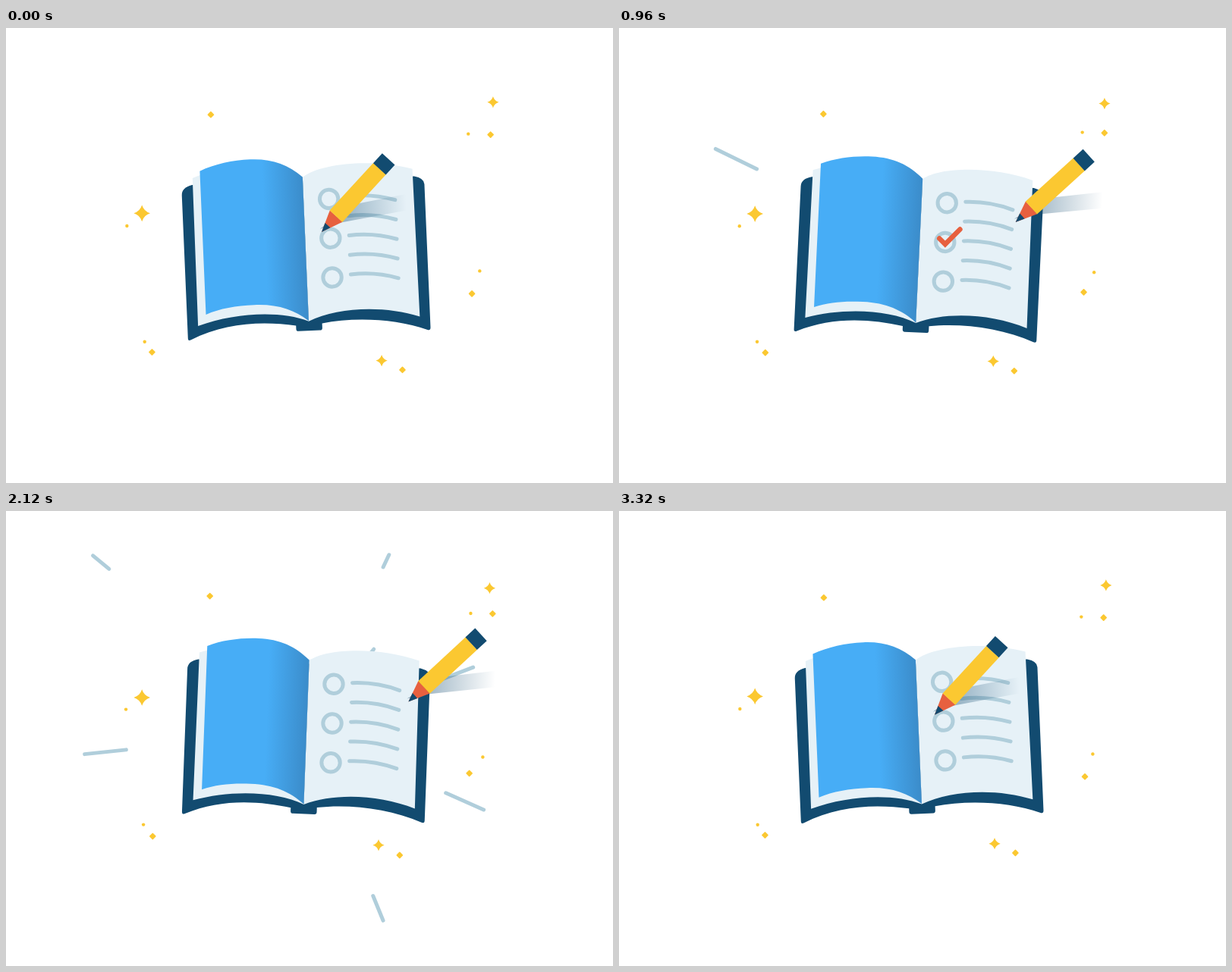
An HTML page with a canvas that plays this animation: 800x600 px, repeating every 3.36 s.

```html
<!DOCTYPE html>
<html lang="en">
<head>
<meta charset="utf-8">
<title>Notebook and pencil</title>
<style>
html, body { margin: 0; width: 100%; height: 100%; overflow: hidden; background: #fff; }
canvas { display: block; width: 800px; height: 600px; }
</style>
</head>
<body>
<canvas id="stage" width="800" height="600"></canvas>
<script>
const ctx = document.getElementById('stage').getContext('2d');
const LOOP = 3360, STEP = 40, TAU = Math.PI * 2, DEG = Math.PI / 180;
const NAVY = '#124b70', PAPER = '#e6f1f7', MIST = '#b0cedb';
const YELLOW = '#fbc831', RED = '#e7603f', BLUE = '#47adf6';

const cover = new Path2D('M250 200Q236 203 236 213V402Q236 406 240 404C285 383 335 383 379 391V395.5Q379 398.5 382 398.5H410.5Q413.5 398.5 413.5 395.5V389.5C455 383 510 387 552 404Q556 405.5 556 401V212Q556 204 543 201Z');
const leftPage = new Path2D('M251 191Q320 165 396 196V386C360 370 300 370 250 386Z');
const rightPage = new Path2D('M396 196C420 178 490 175 541 191L542.5 386C495 369 435 369 396 386Z');
const bluePage = new Path2D('M261 182C281 173.5 305 169.5 328 169.5C356 169.5 377 178 396 195.5V385.5C377 370 356 361.5 325 361.5C301 361.5 280 364 261 371.5Z');
const shade = new Path2D('M-2 -4L18 -10L113 -23.5V-45L42 -34Z');

function fade(from, to, start, end) {
  const g = ctx.createLinearGradient(from, 0, to, 0);
  g.addColorStop(0, start);
  g.addColorStop(1, end);
  return g;
}
const blueFill = fade(343, 396, BLUE, '#3b8cca');
const shadeFill = fade(15, 113, 'rgba(18,75,112,.44)', 'rgba(18,75,112,0)');

// Rays: heading in degrees and first launch
const RAY_LIFE = 420;
const rays = [
  [-154, 703], [-140.5, 190], [-113, 140], [-95, 50], [-64.7, 142], [-50.2, 318], [-20.8, 142],
  [-6.4, 400], [23.9, 137], [52.6, 2401], [67.8, 194], [98, 506], [130.4, 2254], [174, 1835]
];

// Sparkles by shape: x, y and heading of the sway
const sparkles = {
  star: [[179.2, 245.2, -90], [639.6, 99.8, -40], [493, 439.6, -25]],
  gem: [[640, 138, 117], [269.3, 113.2, 60], [192.9, 428.2, -120], [520.6, 452.4, -40], [612.3, 348.1, 52]],
  dot: [[610.9, 137.3, 125], [158.7, 261.3, -24], [181.9, 413.7, 8], [626.4, 322.5, -135]]
};

const check = [[421.7, 273.3], [429.7, 280.5], [448.3, 260]];
const legs = [0, 1].map(i => Math.hypot(check[i + 1][0] - check[i][0], check[i + 1][1] - check[i][1]));
const checkLength = legs[0] + legs[1];

const mix = (a, b, k) => a + (b - a) * k;
const mixPoint = (a, b, k) => [mix(a[0], b[0], k), mix(a[1], b[1], k)];
const ease = (t, from, to) => {
  const u = Math.min(1, Math.max(0, (t - from) / (to - from)));
  return (1 - Math.cos(Math.PI * u)) / 2;
};
const swing = (t, phase) => Math.cos(TAU * t / LOOP - phase * DEG);

function fill(path, color) {
  ctx.fillStyle = color;
  ctx.fill(path);
}

function pen(color, width) {
  ctx.strokeStyle = color;
  ctx.lineWidth = width;
  ctx.lineCap = 'round';
}

function trace(points) {
  ctx.beginPath();
  points.forEach(p => ctx.lineTo(p[0], p[1]));
}

function poly(points, color) {
  trace(points);
  ctx.fillStyle = color;
  ctx.fill();
}

// Each ray runs from the centre to the border of a box, longest on the way
function drawRay(t, heading, first) {
  const x = Math.cos(heading * DEG), y = Math.sin(heading * DEG);
  const reach = Math.min(371 / Math.abs(x), (y > 0 ? 293 : 258) / Math.abs(y));
  // Rays to the right repeat a little slower
  const period = 780 + 120 * Math.max(0, x) ** 2;
  for (let start = first; start + RAY_LIFE < LOOP - STEP; start += period) {
    const u = (t - start) / RAY_LIFE;
    if (u <= 0 || u >= 1) continue;
    const near = .94 * u;
    const off = Math.abs(near - .62) / (near < .62 ? .62 : .32);
    const far = near + .15 * (1 - off ** 1.4);
    trace([near, far].map(k => [395 + x * k * reach, 290 + y * k * reach]));
    ctx.stroke();
  }
}

function drawBook() {
  fill(cover, NAVY);
  fill(leftPage, PAPER);
  fill(rightPage, PAPER);
  fill(bluePage, blueFill);
  pen(MIST, 5);
  for (let i = 0; i < 5; i++) {
    const y = 223.5 + i * 25.8;
    ctx.beginPath();
    ctx.moveTo(454, y);
    ctx.quadraticCurveTo(486, y - 2.5, 516.5, y + 7.5);
    ctx.stroke();
  }
  for (let i = 0; i < 3; i++) {
    ctx.beginPath();
    ctx.arc(429.5, 226 + i * 51.8, 12.2, 0, TAU);
    ctx.stroke();
  }
}

function alongCheck(k) {
  const d = k * checkLength;
  return d < legs[0]
    ? mixPoint(check[0], check[1], d / legs[0])
    : mixPoint(check[1], check[2], (d - legs[0]) / legs[1]);
}

const drawn = t => ease(t, 120, 620);

function drawCheck(t) {
  const from = ease(t, 1160, 1500), to = drawn(t);
  if (to <= from) return;
  const corner = legs[0] / checkLength;
  const bend = from < corner && to > corner ? [check[1]] : [];
  pen(RED, 6.5);
  trace([alongCheck(from), ...bend, alongCheck(to)]);
  ctx.stroke();
}

function pencilTip(t) {
  const home = [418, 269], rest = [528.7, 245.5];
  if (t < 120) return mixPoint(home, check[0], ease(t, 0, 120));
  if (t < 640) return alongCheck(drawn(t));
  if (t < 2000) return mixPoint(check[2], rest, ease(t, 640, 1040));
  return mixPoint(rest, home, ease(t, 2140, 3140));
}

function drawPencil(t) {
  ctx.save();
  ctx.translate(...pencilTip(t));
  fill(shade, shadeFill);
  ctx.rotate(-Math.PI / 4);
  poly([[0, 0], [28.3, -11.3], [28.3, 11.3]], RED);
  poly([[0, 0], [11.8, -4.7], [11.8, 4.7]], NAVY);
  ctx.fillStyle = YELLOW;
  ctx.fillRect(28, -11.3, 85, 22.6);
  ctx.fillStyle = NAVY;
  ctx.fillRect(112.8, -11.3, 17.6, 22.6);
  ctx.restore();
}

const shapes = {
  star(x) {
    const r = x < 300 ? 10.8 : 7.6, c = r * .24;
    ctx.moveTo(r, 0);
    for (let i = 0; i < 4; i++) {
      ctx.quadraticCurveTo(c, c, 0, r);
      ctx.rotate(Math.PI / 2);
    }
  },
  gem() {
    ctx.rotate(Math.PI / 4);
    ctx.roundRect(-3.3, -3.3, 6.6, 6.6, .9);
  },
  dot() {
    ctx.arc(0, 0, 2.2, 0, TAU);
  }
};

function drawSparkle(t, kind, [x, y, heading]) {
  // Sparkles further right sway wider
  const sway = x / 200 * swing(t, 20);
  ctx.save();
  ctx.translate(x + sway * Math.cos(heading * DEG), y + sway * Math.sin(heading * DEG));
  ctx.beginPath();
  shapes[kind](x);
  ctx.fillStyle = YELLOW;
  ctx.fill();
  ctx.restore();
}

function draw(t) {
  ctx.fillStyle = '#fff';
  ctx.fillRect(0, 0, 800, 600);
  pen(MIST, 5);
  rays.forEach(([heading, first]) => drawRay(t, heading, first));
  for (const kind in sparkles) sparkles[kind].forEach(s => drawSparkle(t, kind, s));

  const tilt = -2.45 + 5.25 * (ease(t, 0, 1040) - ease(t, 1760, LOOP));
  ctx.save();
  ctx.translate(395.6 - .7 * swing(t, 0), 291.5 + 1.57 * swing(t, 116.6));
  ctx.rotate(tilt * DEG);
  ctx.translate(-396, -290);
  drawBook();
  drawCheck(t);
  drawPencil(t);
  ctx.restore();
}

const begin = performance.now();
function tick() {
  const t = (performance.now() - begin) % LOOP;
  draw(Math.floor(t / STEP) * STEP);
  requestAnimationFrame(tick);
}
tick();
</script>
</body>
</html>
```
